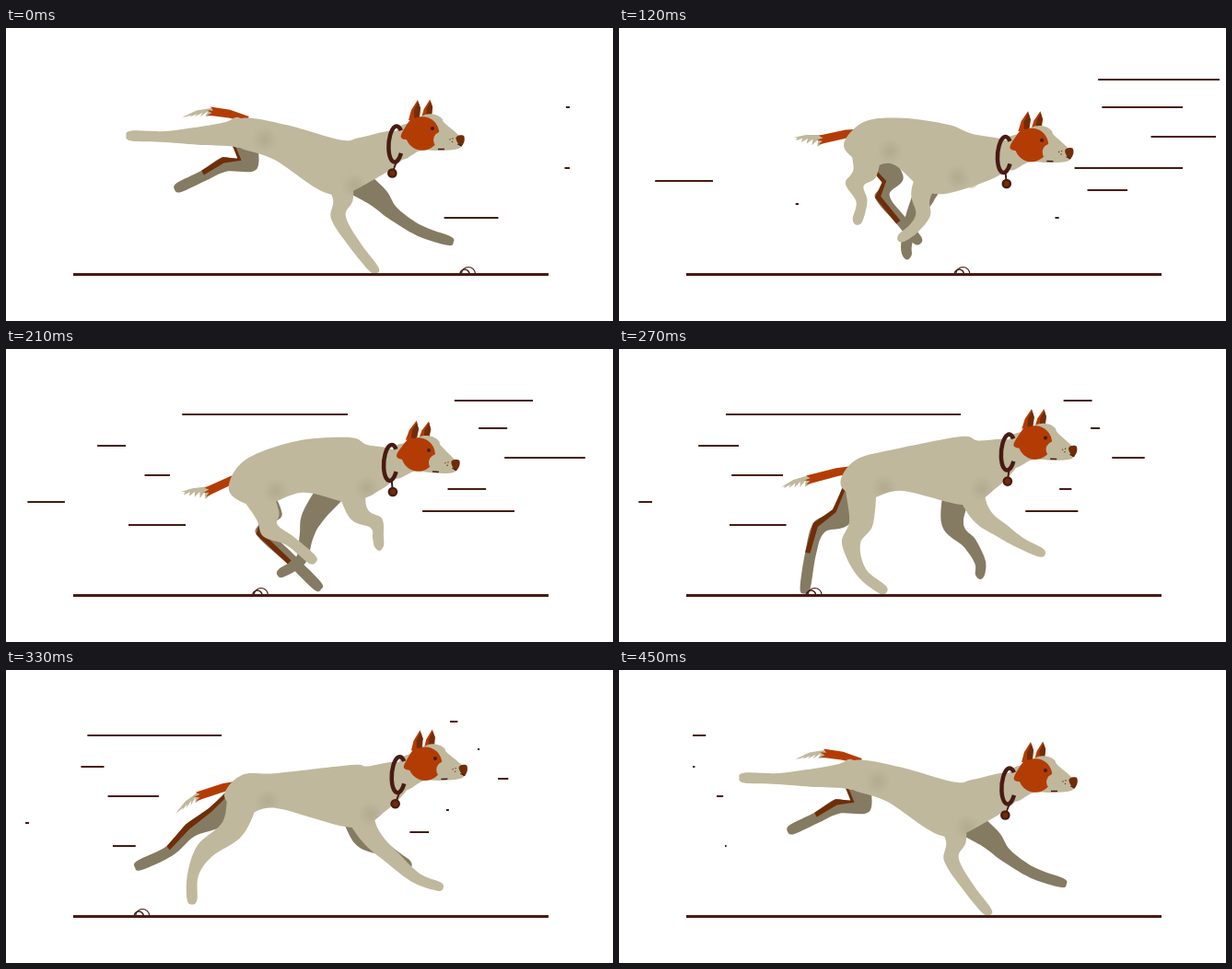
An HTML page with a canvas that plays this animation: 659 by 318 pixels, repeating every 480 ms.

```html
<!DOCTYPE html>
<html lang="en">
<head>
<meta charset="utf-8">
<title>Running dog</title>
<style>
  html, body { margin: 0; width: 100%; height: 100%; overflow: hidden; background: #fff; }
  canvas { display: block; }
</style>
</head>
<body>
<canvas id="stage" width="659" height="318"></canvas>
<script>
const ctx = document.getElementById('stage').getContext('2d');
const LOOP = 480, STEP = 30, STRIDE = 450, GROUND = 267;
const COAT = '#bfb89c', SHADE = '#857b63', PALE = '#ddd8c6', RUST = '#b33c05', BROWN = '#702d07', INK = '#481b13';

// Key poses of one stride; every row below belongs to one of these times.
const TIMES = [0, 60, 150, 210, 270, 330];

// Pelvis, loin and chest as x, y, radius.
const SPINE = [
  [255,113,16, 298,124,20, 358,151,30],
  [260,118,22, 300,122,25, 355,145,35],
  [271,131,25, 306,124,26, 348,140,39],
  [267,146,26, 318,128,28, 372,131,35],
  [262,142,22, 305,131,23, 374,132,37],
  [258,135,21, 294,131,19, 376,137,34]
];
// Eye x, y and tilt in degrees.
const HEAD = [[463,109,0], [462,118,0], [458,121.5,3], [459,110,5], [463,96.5,2], [466,96,-1]];
// Where the tail turns pale, and its tip.
const TAIL = [[221,90, 191,97], [217,90, 186,89], [218,137, 191,135], [217,155, 190,155], [204,142, 176,150], [207,137, 184,156]];

// Legs hang from pelvis or chest; joints are knee, hock, paw and toe.
const NEAR_HIND = { radii: [16, 13, 10, 6, 5.5], joints: [
  [240,115, 212,117, 172,118, 136,117], [250,133, 235,145, 217,153, 192,171],
  [275,168, 266,181, 284,202, 290,222], [284,180, 287,197, 308,208, 332,228],
  [263,188, 252,211, 263,242, 286,261], [246,172, 216,196, 203,222, 202,249]
] };
const FAR_HIND = { radii: [14, 12, 8, 6, 5.5], joints: [
  [262,147, 237,148, 215,160, 188,173], [288,157, 275,174, 293,198, 296,218],
  [298,168, 287,186, 307,213, 330,235], [288,181, 279,198, 310,229, 338,257],
  [241,182, 217,194, 208,222, 202,260], [227,160, 200,174, 178,196, 145,212]
] };
const NEAR_FORE = { radii: [16, 11, 8, 6, 5], joints: [
  [366,185, 361,206, 380,237, 400,262], [331,178, 328,197, 314,217, 296,228],
  [335,180, 341,203, 336,217, 328,228], [382,177, 402,189, 404,204, 405,214],
  [392,178, 417,198, 437,211, 458,221], [395,179, 421,205, 446,226, 470,235]
] };
const FAR_FORE = { radii: [16, 12, 7.5, 6, 5], joints: [
  [402,182, 420,201, 449,220, 481,231], [359,184, 349,205, 350,240, 364,263],
  [322,183, 311,208, 304,231, 298,238], [334,180, 326,204, 320,229, 299,243],
  [362,188, 381,211, 392,231, 392,245], [388,181, 411,195, 425,204, 436,211]
] };

// Wind lines: y, left end, right end, first 30 ms beat.
const WIND = [
  [56,482,652,1], [86,512,612,0], [118,534,648,2], [152,478,612,0], [206,473.5,663,-7], [176,438,552,3],
  [166,21,102,1], [191,115,195,4], [105,80,130,5], [137,106,178,6], [71,80,371,5]
];

const mix = (a, b, k) => a + (b - a) * k;
const mixPt = (a, b, k) => [mix(a[0], b[0], k), mix(a[1], b[1], k)];
const add = (p, x, y) => [p[0] + x, p[1] + y];
const pairs = list => list.flatMap((v, i) => i % 2 ? [] : [[v, list[i + 1]]]);

// Smooth cyclic interpolation between the key poses.
function pose(rows, time) {
  const t = time % STRIDE, n = TIMES.length;
  let i = n - 1;
  while (TIMES[i] > t) i--;
  const at = k => TIMES[(k + n) % n] + STRIDE * Math.floor(k / n);
  const row = k => rows[(k + n) % n];
  const span = at(i + 1) - at(i), u = (t - at(i)) / span, v = 1 - u;
  const slope = (k, j) => (row(k + 1)[j] - row(k - 1)[j]) / (at(k + 1) - at(k - 1)) * span;
  return row(i).map((a, j) =>
    a * v * v * (1 + 2 * u) + slope(i, j) * u * v * v
    + row(i + 1)[j] * u * u * (3 - 2 * u) - slope(i + 1, j) * u * u * v);
}

function fill(color) {
  ctx.fillStyle = color;
  ctx.fill();
}

// Closed smooth curve through the points.
function blob(points, color) {
  const n = points.length, p = k => points[(k + n) % n];
  ctx.beginPath();
  ctx.moveTo(...p(0));
  for (let k = 0; k < n; k++) {
    const [a, b, c, d] = [p(k - 1), p(k), p(k + 1), p(k + 2)];
    ctx.bezierCurveTo(b[0] + (c[0] - a[0]) / 6, b[1] + (c[1] - a[1]) / 6,
      c[0] - (d[0] - b[0]) / 6, c[1] - (d[1] - b[1]) / 6, ...c);
  }
  fill(color);
}

function poly(points, color) {
  ctx.beginPath();
  points.forEach(p => ctx.lineTo(...p));
  fill(color);
}

function dot(x, y, r, color) {
  ctx.beginPath();
  ctx.arc(x, y, r, 0, 7);
  fill(color);
}

function line(x1, y1, x2, y2, width) {
  ctx.beginPath();
  ctx.moveTo(x1, y1);
  ctx.lineTo(x2, y2);
  ctx.lineWidth = width;
  ctx.strokeStyle = INK;
  ctx.stroke();
}

// Rounded shape around a chain of joints; returns its back edge.
function limb(chain, radii, color) {
  const last = chain.length - 1;
  const dir = chain.map((_, i) => {
    const a = chain[Math.max(0, i - 1)], b = chain[Math.min(last, i + 1)];
    const len = Math.hypot(b[0] - a[0], b[1] - a[1]) || 1;
    return [(b[0] - a[0]) / len, (b[1] - a[1]) / len];
  });
  const shift = (i, along, side) => {
    const [dx, dy] = dir[i], r = radii[i];
    const [x, y] = add(chain[i], (dx * along - dy * side) * r, (dy * along + dx * side) * r);
    return [x, Math.min(y, GROUND)];
  };
  const back = chain.map((_, i) => shift(i, 0, 1)), front = chain.map((_, i) => shift(i, 0, -1));
  blob([shift(0, -1, 0), ...back, shift(last, 1, 0), ...front.reverse()], color);
  return back;
}

function leg({ radii, joints }, root, t, color) {
  const chain = [root, ...pairs(pose(joints, t))];
  return { chain, back: limb(chain, radii, color) };
}

function stripe({ chain, back }) {
  const inner = [.2, .4, .8, .9].map((k, i) => mixPt(back[i], chain[i], k));
  poly([...back.slice(0, 4), ...inner.reverse()], BROWN);
}

function tail(base, t) {
  const [mid, tip] = pairs(pose(TAIL, t));
  const dx = mid[0] - base[0], dy = mid[1] - base[1], len = Math.hypot(dx, dy);
  const off = (p, side, along = 0) => add(p, (dx * along - dy * side) / len, (dy * along + dx * side) / len);
  const tuft = [off(mid, 4.5, -4), off(mixPt(mid, tip, .5), 4), tip];
  for (let k = .1; k < 1; k += .2) {
    tuft.push(mixPt(tip, mid, k + .05), off(mixPt(tip, off(mid, -6), k + .12), -1, 4));
  }
  poly([...tuft, off(mid, -4.5, -4)], COAT);
  const half = mixPt(base, mid, .5);
  poly([off(base, 3), off(half, 6), off(mid, 4.5), off(mid, 1, -4), off(mid, 0, 3),
    off(mid, -2, -3), off(mid, -5, 2), off(half, -3), off(base, -3)], RUST);
}

function shadow([x, y]) {
  const g = ctx.createRadialGradient(x, y, 1, x, y, 14);
  g.addColorStop(0, 'rgba(133,123,99,.2)');
  g.addColorStop(1, 'rgba(133,123,99,0)');
  ctx.fillStyle = g;
  ctx.fillRect(x - 14, y - 14, 28, 28);
}

// Drawn around the eye.
function head(x, y, angle) {
  ctx.save();
  ctx.translate(x, y);
  ctx.rotate(angle);
  for (const [dx, dy, s] of [[0, 0, 1], [12.5, -2, .95]]) {
    const ear = list => pairs(list).map(p => [p[0] * s + dx, p[1] * s + dy]);
    poly(ear([-26,-9, -23,-20, -16,-31, -13,-22, -14,-10]), RUST);
    poly(ear([-20,-9, -20,-20, -15.5,-29, -13,-22, -15,-10]), BROWN);
  }
  blob(pairs([-39,2, -23,-7, -8,-15, 3,-15, 10,-11, 13,-6, 27,6, 33,14, 28,22, 7,24, -13,24, -34,33]), COAT);
  blob(pairs([-34,10, -31,1, -20,-12, -12,6, -25,12]), RUST);
  dot(-11, 5.5, 18.3, RUST);
  dot(10, 12.5, 9, COAT);
  dot(0, 0, 2, INK);
  blob(pairs([25.5,10, 29,7.5, 34,8, 34.5,14, 31,19.5, 27,15]), BROWN);
  line(27, 17, 32, 19, 1);
  line(6, 22.5, 13, 22.5, 1.5);
  for (const [a, b] of [[19, 12], [22, 11], [21.5, 14.5]]) dot(a, b, .7, BROWN);
  ctx.restore();
}

function collar([x, y], t) {
  const tagX = x - 1 - 4 * Math.cos(2 * Math.PI * (t + 60) / STRIDE), tagY = y + 31.5;
  ctx.beginPath();
  ctx.ellipse(x, y, 7.5, 19.5, .07, .5, 5.4);
  ctx.lineWidth = 4.5;
  ctx.strokeStyle = INK;
  ctx.stroke();
  line(x + 1, y + 19, tagX, tagY, 2);
  dot(tagX, tagY, 5.3, INK);
  dot(tagX, tagY, 3, BROWN);
}

function dog(t) {
  const [px, py, pr, lx, ly, lr, cx, cy, cr] = pose(SPINE, t);
  const [eyeX, eyeY, tilt] = pose(HEAD, t);
  const angle = tilt * Math.PI / 180, cos = Math.cos(angle), sin = Math.sin(angle);
  const ring = [eyeX - 40 * cos - 17 * sin, eyeY + 17 * cos - 40 * sin];
  const pelvis = [px, py], chest = [cx, cy], neck = add(ring, 3, 0);
  const shoulder = add(mixPt(chest, neck, .5), 0, 3), girth = mix(cr, 16, .5) + 1;

  dot(shoulder[0] - 2, shoulder[1] + girth - 4, 7, PALE);
  leg(FAR_FORE, chest, t, SHADE);
  stripe(leg(FAR_HIND, pelvis, t, SHADE));
  tail(add(pelvis, 8, -14), t);
  limb([pelvis, [lx, ly], chest, shoulder, neck], [pr, lr, cr, girth, 16], COAT);
  leg(NEAR_HIND, pelvis, t, COAT);
  leg(NEAR_FORE, chest, t, COAT);
  ctx.globalCompositeOperation = 'source-atop';
  shadow(add(pelvis, 26, 8));
  shadow(add(chest, 20, 20));
  ctx.globalCompositeOperation = 'source-over';
  head(eyeX, eyeY, angle);
  collar(ring, t);
}

// Both ends of a line run left with the same ease-out, the right one later.
function wind(t) {
  const left = u => (1 - Math.min(1, Math.max(0, u / 360))) ** 5;
  for (const [y, x1, x2, beat] of WIND) {
    const u = t + 3 - beat * STEP, a = mix(x1, x2, left(u)), b = mix(x1, x2, left(u - 140));
    if (b - a > 1.2) line(a, y, b, y, 2);
  }
}

function pebble(t) {
  const x = 501 - t * 1.072;
  if (x < 75) return;
  ctx.strokeStyle = INK;
  for (const [dx, r, w] of [[1, 7.5, 1.1], [-3, 5, 1.6]]) {
    ctx.beginPath();
    ctx.arc(x + dx, GROUND, r, Math.PI, 0);
    ctx.lineWidth = w;
    ctx.stroke();
  }
}

function draw(now) {
  const t = Math.floor(now % LOOP / STEP) * STEP;
  ctx.clearRect(0, 0, 659, 318);
  dog(t);
  wind(t);
  line(73, 267.5, 589, 267.5, 3);
  pebble(t);
}

let begin;
function tick(now) {
  begin ??= now;
  draw(now - begin);
  requestAnimationFrame(tick);
}
draw(0);
requestAnimationFrame(tick);
</script>
</body>
</html>
```
